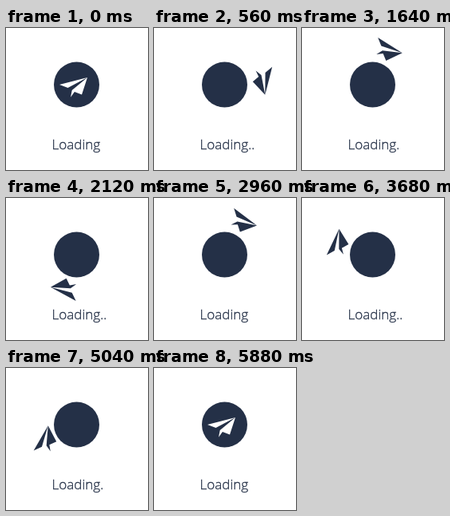
An HTML page for the animation above (6.24 s loop, 178x178 px).

```html
<!DOCTYPE html>
<html lang="en">
<head>
<meta charset="utf-8">
<title>Loading</title>
<style>
  html, body { margin: 0; width: 100%; height: 100%; overflow: hidden; background: #fff; }
  svg { display: block; width: 100vw; height: 100vh; fill: #243047; }
  text { font: 300 17px "Open Sans", sans-serif; stroke: #243047; stroke-width: .3px; }
</style>
</head>
<body>
<svg viewBox="0 0 178 178">
  <defs>
    <clipPath id="disc"><circle cx="88.5" cy="71" r="28.5"/></clipPath>
    <!-- paper plane, relative to the disc centre -->
    <path id="shape" d="M13.5-9L-21.5 0L-11 4.1ZM13.5-9L-5.8 7L-7.5 15.8L-2.6 9L6.5 12.5Z"/>
  </defs>
  <use class="plane" href="#shape"/>
  <circle cx="88.5" cy="71" r="28.5"/>
  <g clip-path="url(#disc)" fill="#fff"><use class="plane" href="#shape"/></g>
  <text x="57.6" y="152">Loading<tspan id="dots"></tspan></text>
</svg>
<script>
const LOOP = 6240, DOT_CYCLE = 1560, TURN = 1300;
const CENTER = [88.5, 71], ORBIT_SHIFT = [1, -0.6], RADIUS = 47.4, RADIAL = 249;
const LAUNCH = 110, JOIN = 620, LEAVE = 4720, LAND = 5280;
const planes = document.querySelectorAll('.plane');
const dots = document.getElementById('dots');

// Each lap is slowest at its start and fastest halfway.
function lapAngle(t) {
  const laps = (t - 67) / TURN;
  return 360 * laps - 30 * Math.sin(2 * Math.PI * laps);
}

function orbitPoint(angle) {
  const a = (RADIAL + angle) * Math.PI / 180;
  return [ORBIT_SHIFT[0] + RADIUS * Math.cos(a), ORBIT_SHIFT[1] + RADIUS * Math.sin(a)];
}

function bezier(a, b, c, d, s) {
  const r = 1 - s;
  return a.map((v, i) => r * r * r * v + 3 * r * r * s * b[i] + 3 * r * s * s * c[i] + s * s * s * d[i]);
}

const HOME = [0, 0];
const joinAngle = lapAngle(JOIN), leaveAngle = lapAngle(LEAVE);
const joinPoint = orbitPoint(joinAngle), leavePoint = orbitPoint(leaveAngle);

function planePose(t) {
  if (t <= LAUNCH || t >= LAND) return { angle: 0, point: HOME };
  if (t < JOIN) {
    const s = ((t - LAUNCH) / (JOIN - LAUNCH)) ** 1.3;
    return { angle: joinAngle * s, point: bezier(HOME, [30, -30], [66, -47], joinPoint, s) };
  }
  if (t < LEAVE) {
    const angle = lapAngle(t);
    return { angle, point: orbitPoint(angle) };
  }
  const s = 1 - ((LAND - t) / (LAND - LEAVE)) ** 1.3;
  return {
    angle: leaveAngle + (1440 - leaveAngle) * s,
    point: bezier(leavePoint, [-68, 26], [-52, 22], HOME, s)
  };
}

function dotCount(t) {
  const phase = (t + 360) % DOT_CYCLE;
  return [400, 760, 1120].filter(start => phase >= start).length;
}

function draw(t) {
  const { angle, point } = planePose(t);
  const x = CENTER[0] + point[0], y = CENTER[1] + point[1];
  for (const plane of planes) plane.setAttribute('transform', `translate(${x} ${y}) rotate(${angle})`);
  dots.textContent = '.'.repeat(dotCount(t));
}

const start = performance.now();
function tick() {
  const t = (performance.now() - start) % LOOP;
  draw(Math.floor(t / 40) * 40);
  requestAnimationFrame(tick);
}
tick();
</script>
</body>
</html>
```
